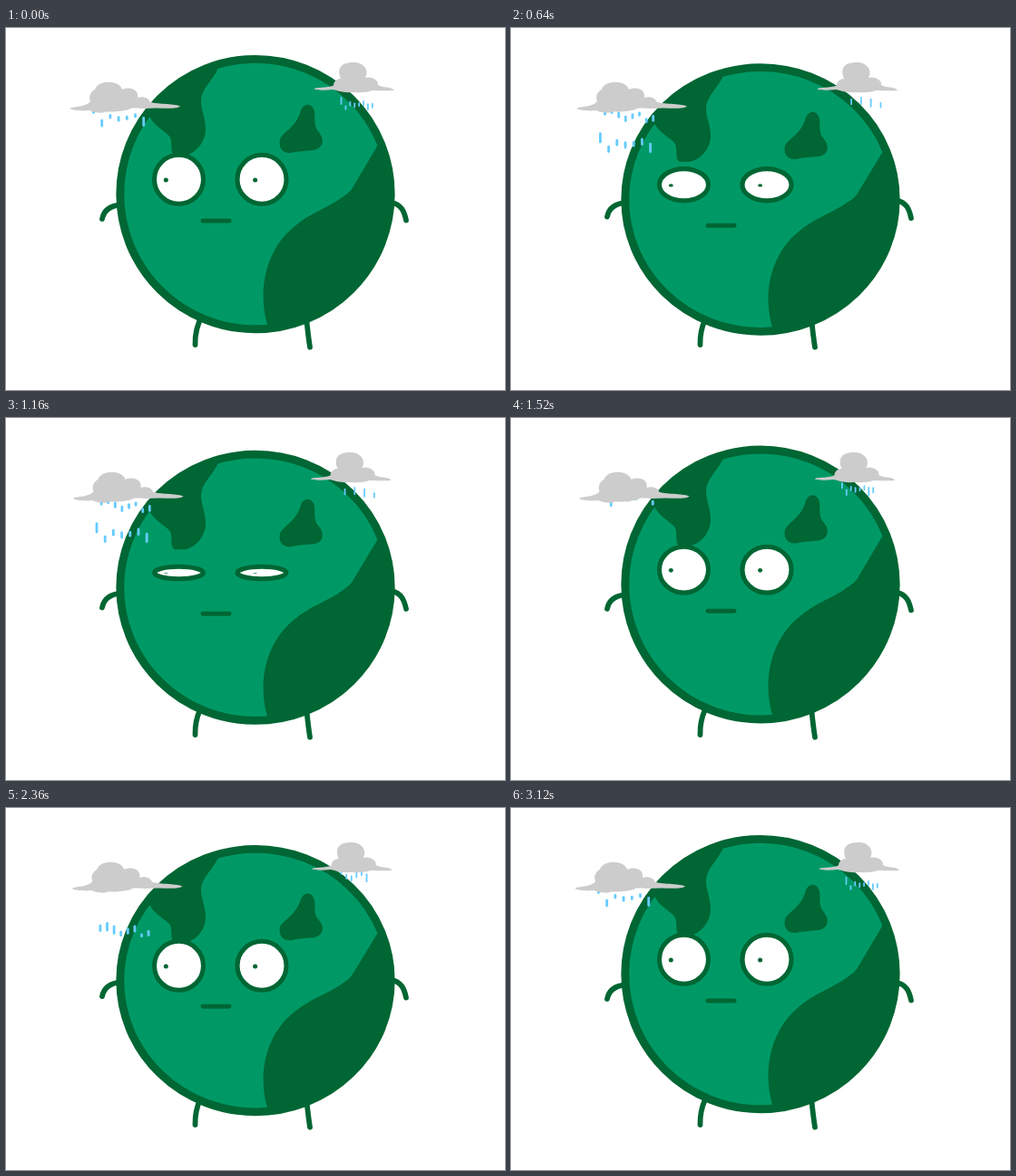
Animation of 550x400 px, one loop 3160 ms. Source, as an HTML page:

```html
<!DOCTYPE html>
<html lang="en">
<head>
<meta charset="utf-8">
<title>Rainy planet</title>
<style>
  html, body { margin: 0; width: 100%; height: 100%; overflow: hidden; background: #fff; }
  svg { display: block; width: 550px; height: 400px; }
  .line { fill: none; stroke: #063; stroke-linecap: round; stroke-width: 5.8; }
  .land { fill: #063; }
  .cloud { fill: #ccc; }
  .rain { stroke: #6cf; stroke-linecap: round; }
</style>
</head>
<body>
<svg viewBox="0 0 550 400">
  <defs>
    <clipPath id="disc"><circle cx="275" cy="183.6" r="149"/></clipPath>
  </defs>
  <g class="line">
    <path d="M217 316Q208 332 208.5 350"/>
    <path d="M331 320Q333 340 335 352.7"/>
    <g id="arms">
      <path d="M127 195.5C116 196 108 201 106 211"/>
      <path d="M425 193C436 195 439 203 441 212.5"/>
    </g>
  </g>
  <g id="body">
    <circle cx="275" cy="183.6" r="149" fill="#096"/>
    <g class="land" clip-path="url(#disc)">
      <path d="M233 46C228 57 215 68 215 80C215 92 220 98 220 112C220 128 206 141 195 141L186 141C180 138 184 128 181 121C178 115 163 109 158 97L110 60L233 20Z"/>
      <path d="M410 129L384 173C381 179 378 182 372 186C355 199 335 204 317 220C289 243 276 285 288 328V345H440V130Z"/>
    </g>
    <path class="land" d="M325 91C328 83 337 82 340 92C341 101 339 108 344 114C352 123 350 133 339 135C330 136 322 136 314 138C304 139 300 131 302 123C305 115 320 110 325 91Z"/>
    <circle cx="275" cy="183.6" r="149.2" fill="none" stroke="#063" stroke-width="8.9"/>
    <path class="line" style="stroke-width:5" d="M217 213H246"/>
  </g>
  <g id="eyes" stroke="#063"></g>
  <g id="leftCloud">
    <g id="leftRain" class="rain" stroke-width="2.8"></g>
    <path class="cloud" d="M70.5 89C74 86 88 88 93 81C90 73 96 69 98 68C101 57 125 57 128 68C136 64 147 68 145 77C151 75 157 77 159 82C168 84 188 84 192 86.5C190 89 180 89 166 88.5C155 89 145 89 138 88.5C134 92 115 93 110 92.5C106 95 95 93 92 91C85 92 73 91 70.5 89Z"/>
  </g>
  <g id="rightCloud">
    <g id="rightRain" class="rain" stroke-width="1.8"></g>
    <path class="cloud" d="M339.5 67.5C341 65 354 66.5 361 63.5C361 59 365 56 369 56C363 41 374 38 382 38C393 37 401 46 396 55C402 53 411 57 410 63C415 66 425 65 428 68.5C424 70 412 69 404 69C398 72 385 71 381 71C372 72 365 69 360 68C352 69 342 69 339.5 67.5Z"/>
  </g>
</svg>
<script>
const LOOP = 3160, CYCLE = 3120, STEP = 40, BLINK = 780, RAIN = 520;
const $ = id => document.getElementById(id);
const clamp = v => Math.min(1, Math.max(0, v));
const mod = (a, n) => (a % n + n) % n;
const triangle = (t, period) => 1 - Math.abs(1 - 2 * (t % period) / period);
const random = seed => mod(Math.sin(seed * 12.9898) * 43758.5453, 1);

function set(el, attrs) {
  for (const key in attrs) el.setAttribute(key, attrs[key]);
}
function add(parent, tag, attrs) {
  const el = document.createElementNS('http://www.w3.org/2000/svg', tag);
  set(el, attrs);
  return parent.appendChild(el);
}

// Each burst is a row of drops released below the cloud at about the same time.
function makeRain({ id, bursts, top, fall, life, stretch }) {
  const drops = bursts.flatMap(({ x, gap, count, birth }, row) =>
    Array.from({ length: count }, (_, i) => {
      const seed = row * 20 + i + 1;
      const dropX = x + gap * i;
      return {
        line: add($(id), 'line', { x1: dropX, x2: dropX }),
        birth: birth + 60 * (random(seed) - 0.5),
        stretch: stretch * (0.5 + random(seed + 0.5))
      };
    }));
  return t => {
    for (const { line, birth, stretch } of drops) {
      const u = mod(t - birth, RAIN) / life;
      const y = top + fall * u;
      const half = 0.1 + stretch / 2 * Math.sin(Math.PI * clamp(u));
      set(line, { y1: y - half, y2: y + half, visibility: u < 1 ? 'visible' : 'hidden' });
    }
  };
}

const drawLeftRain = makeRain({
  id: 'leftRain', top: 89, fall: 59, life: 245, stretch: 8,
  bursts: [
    { x: 96.5, gap: 9.2, count: 7, birth: -40 },
    { x: 101.6, gap: 7.6, count: 8, birth: 95 }
  ]
});
const drawRightRain = makeRain({
  id: 'rightRain', top: 68, fall: 25, life: 170, stretch: 6,
  bursts: [
    { x: 369.5, gap: 4.9, count: 8, birth: -110 },
    { x: 377, gap: 10.8, count: 4, birth: 25 },
    { x: 371.8, gap: 5.6, count: 6, birth: 230 }
  ]
});

const eyes = [[190.5, 176.3], [282, 274.6]].map(([cx, pupilX]) => ({
  white: add($('eyes'), 'ellipse', { cx, cy: 167.3, rx: 27, fill: '#fff', 'stroke-width': 5.1 }),
  pupil: add($('eyes'), 'ellipse', { cx: pupilX, cy: 168, rx: 2.5, fill: '#063', stroke: 'none' })
}));

function lidClosure(t) {
  const p = t % BLINK;
  return clamp((Math.min(p, BLINK - p) - 20) / 260);
}

function draw(time) {
  const t = Math.floor((time % LOOP) / STEP) * STEP % CYCLE;
  const dip = triangle(t, CYCLE / 2);
  const drift = 4.7 * triangle(t, CYCLE);

  set($('body'), { transform: `matrix(1 0 0 ${1 - 0.0274 * dip} 0 ${12.22 * dip})` });
  set($('arms'), { transform: `translate(0 ${-3 * dip})` });
  set($('eyes'), { transform: `translate(0 ${7.2 * dip})` });

  const ry = 27 - 20.3 * lidClosure(t);
  for (const { white, pupil } of eyes) {
    set(white, { ry });
    set(pupil, { ry: 2.5 * (ry - 2.5) / 24.5 });
  }

  set($('leftCloud'), { transform: `translate(${drift} 0)` });
  set($('rightCloud'), { transform: `translate(${-drift} 0)` });
  drawLeftRain(t);
  drawRightRain(t);
}

const start = performance.now();
function tick() {
  draw(performance.now() - start);
  requestAnimationFrame(tick);
}
tick();
</script>
</body>
</html>
```
